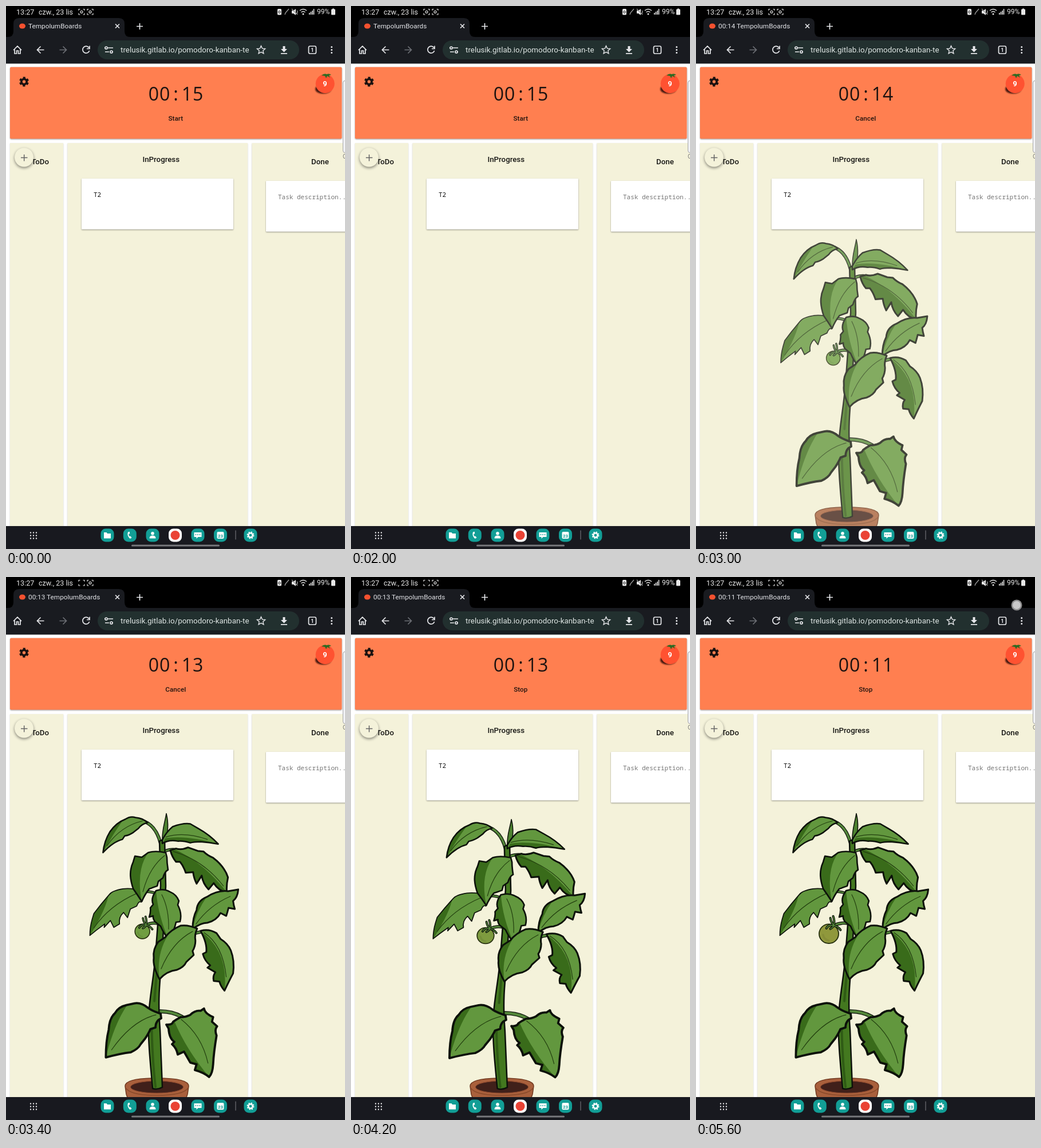
Animation of 592x947 px, one loop 5.8 s. Source, as an HTML page:

```html
<!DOCTYPE html>
<html lang="en">
<head>
<meta charset="utf-8">
<title>Kanban timer</title>
<style>
html, body { margin: 0; width: 100%; height: 100%; overflow: hidden; background: #fff; }
svg { display: block; font-family: Roboto, Arial, sans-serif; }
.line { fill: none; stroke: #e6e7ea; stroke-width: 1.7; }
.mono { font: 11px "Noto Sans Mono", "DejaVu Sans Mono", monospace; }
.clock { font: 32px "Open Sans", "Noto Sans", sans-serif; letter-spacing: .9px; fill: #1b1210; }
.head { font-size: 13.3px; font-weight: 500; fill: #161613; }
.card { filter: drop-shadow(0 1px 1.2px #0006); }
.panel { filter: drop-shadow(0 1px 1px #0003); }
.mid { text-anchor: middle; }
</style>
</head>
<body>
<svg width="592" height="947" viewBox="0 0 592 947">
  <defs><clipPath id="page"><rect y="100" width="592" height="807"/></clipPath></defs>
  <rect width="592" height="947" fill="#fff"/>

  <!-- status bar -->
  <rect width="592" height="100"/>
  <g fill="#e8e8e8">
    <text x="18" y="14.5" font-size="12.6">13:27</text>
    <text x="57" y="14.5" font-size="12.5">czw., 23 lis</text>
    <text x="543" y="14.3" font-size="12">99%</text>
    <rect x="568" y="5.5" width="7" height="10" rx="1.3"/><rect x="570" y="4.5" width="3" height="2"/>
    <rect x="474" y="5" width="7" height="10.5" rx="1.5"/>
    <path d="M499 8h3l4-3v11l-4-3h-3zM529 15v-3h1.6v3zm2.7 0v-5h1.6v5zm2.7 0v-7h1.6v7zM536.8 5h1.5v10h-1.5z"/>
    <circle cx="519" cy="14" r="1.5"/>
  </g>
  <circle cx="477.5" cy="10.5" r="1.8" fill="none" stroke="#111"/>
  <path d="M487 15l1-3 6-7M499 5l10 10M508 8q2 2 0 5" fill="none" stroke="#999" stroke-width="1.4"/>
  <path d="M513 8q6-5 12 0M515.5 11q3.5-3 7 0" fill="none" stroke="#e8e8e8" stroke-width="1.4"/>
  <g id="marks" fill="none" stroke="#ddd" stroke-width="1.2"></g>

  <!-- tab strip and toolbar -->
  <path d="M3 54q10 0 10-10V31q0-10 10-10h174q10 0 10 10v13q0 10 10 10h375v46.5H0V54z" fill="#191b20"/>
  <ellipse cx="28.5" cy="35" rx="5.5" ry="4.5" fill="#f4512f"/>
  <text id="title" x="39" y="39" font-size="11.8" fill="#e3e4e8"></text>
  <path class="line" d="M191 31.5l7 7m0-7l-7 7M228 35.5h11m-5.5-5.5v11" stroke-width="1.3"/>
  <rect x="160" y="60" width="352" height="33" rx="16.5" fill="#22302f"/>
  <text x="200" y="81" font-size="13.4" fill="#dfe6e4">trelusik.gitlab.io/pomodoro-kanban-te</text>
  <path class="line" d="M13 77l7-7 7 7M15 75v8h3.5v-5h3v5H25v-8M66.5 76.5H54.5m6-6l-6 6 6 6"/>
  <path class="line" d="M93.5 76.5h12m-6-6l6 6-6 6" style="stroke:#6d6f75"/>
  <path class="line" d="M145 73a6 6 0 1 0 .6 5M146 69.5v5h-5"/>
  <path class="line" d="M172 73h1m5 0h9M173 80h7m6 0h1"/>
  <circle class="line" cx="175" cy="73" r="2"/><circle class="line" cx="184" cy="80" r="2"/>
  <path class="line" d="M445.5 69.5l2.1 4.6 5 .5-3.8 3.3 1.1 5-4.4-2.6-4.4 2.6 1.1-5-3.8-3.3 5-.5z" style="stroke-width:1.4"/>
  <path d="M483.5 70h4v5h3.5l-5.5 5.5-5.5-5.5h3.5zM480 82h11v1.7h-11z" fill="#e6e7ea"/>
  <rect class="line" x="528.5" y="70" width="13" height="13" rx="2.5"/>
  <text class="mid" x="535" y="80" font-size="9.5" font-weight="700" fill="#e6e7ea">1</text>
  <path d="M568.7 71.5v0m0 5v0m0 5v0" stroke="#e6e7ea" stroke-width="3" stroke-linecap="round"/>

  <!-- timer panel -->
  <rect class="card" x="7" y="106.5" width="579.5" height="125" rx="2" fill="#ff7f50"/>
  <g fill="none" stroke="#1b1210">
    <circle cx="31.5" cy="132" r="4.6" stroke-width="3.8"/>
    <circle cx="31.5" cy="132" r="7" stroke-width="3" stroke-dasharray="4 3.33" transform="rotate(14 31.5 132)"/>
  </g>
  <ellipse cx="554" cy="145" rx="14" ry="8" fill="#4a1a10" style="filter:blur(1px)"/>
  <circle cx="557.2" cy="135.5" r="16.5" fill="#ff5231"/>
  <path d="M551 121q5-4 9-2 4-2 8 1l-4 1 2 4-5-3-2 4-2-4z" fill="#2c6b22"/>
  <text class="mid" x="557" y="140" font-size="13" font-weight="700" fill="#fff">9</text>
  <text class="clock" x="248.8" y="164.5">00</text>
  <text class="clock" x="292.2" y="164.5">:</text>
  <text class="clock" x="306.7" y="164.5" id="secs"></text>
  <text class="mid" x="296.3" y="200" font-size="11.7" font-weight="500" fill="#22130e" id="button"></text>

  <!-- board -->
  <g clip-path="url(#page)">
    <g fill="#f4f2da">
      <rect class="panel" x="7" y="239" width="93" height="680"/>
      <rect class="panel" x="107.5" y="239" width="314.5" height="680"/>
      <rect class="panel" x="429.5" y="239" width="180" height="680"/>
    </g>
    <text class="head" x="75" y="275.5" text-anchor="end">ToDo</text>
    <text class="head mid" x="270.8" y="271.5">InProgress</text>
    <text class="head" x="533" y="275.5">Done</text>
    <rect class="card" x="132" y="301" width="265" height="88.5" rx="1" fill="#fff"/>
    <rect class="card" x="454" y="305" width="160" height="88.5" rx="1" fill="#fff"/>
    <text class="mono" x="153" y="333" fill="#111">T2</text>
    <text class="mono" x="475" y="337" fill="#757575">Task description...</text>
    <circle cx="31.5" cy="264" r="16.5" fill="#f4f2da" style="filter:drop-shadow(0 2px 2.5px #0007)"/>
    <path d="M26 264.5h11.5M31.7 259v11.5" stroke="#666" stroke-width="1.5"/>
    <rect x="588.5" y="130" width="12" height="126" rx="4" fill="#f1f2f5" stroke="#a5a5a8"/>
    <text x="588" y="266" font-size="10" fill="#777">C</text>
    <g id="plant">
      <path d="M208 888q0-14 55.500-14t55.500 14l-2 14-5 14h-97l-5-14z" fill="#a9603c" stroke="#70381f" stroke-width="1.5"/>
      <path d="M209 891q8 13 54.500 13t54.500-13" fill="none" stroke="#8a4a2b" stroke-width="1.5"/>
      <ellipse cx="263.5" cy="889.5" rx="46" ry="10.5" fill="#40201a" stroke="#84432a"/>
      <g id="sway" stroke-linejoin="round" stroke-linecap="round"></g>
    </g>
  </g>

  <!-- dock -->
  <rect y="907" width="592" height="40" fill="#18191f"/>
  <path id="dots" stroke="#e8e8ea" stroke-width="2.4" stroke-linecap="round"/>
  <g id="tiles"></g>
  <path d="M401 914.5v16" stroke="#6a6b70" stroke-width="1.3"/>
  <g fill="#fff">
    <path d="M171 918h4.500l1.500 2h6v8.500h-12z"/>
    <path d="M213 917.500q-2.500 6 3.500 11.500l3-1.500-2-3-1.700.5q-2-2-1.500-4l2-.7-.5-3.500z"/>
    <circle cx="256" cy="919.7" r="2.8"/><path d="M250.500 928.500q0-5 5.500-5t5.500 5z"/>
    <path d="M328.500 918h13v8h-6l-3 3v-3h-4z"/>
    <rect x="368.5" y="917" width="12" height="12" rx="2"/>
  </g>
  <path d="M331.500 922v0m3.500 0v0m3.500 0v0" stroke="#129e96" stroke-width="1.8" stroke-linecap="round"/>
  <text class="mid" x="374.5" y="926.5" font-size="8" font-weight="700" fill="#129e96">23</text>
  <circle cx="427" cy="923" r="3.7" fill="none" stroke="#fff" stroke-width="2.5"/>
  <circle cx="427" cy="923" r="5.5" fill="none" stroke="#fff" stroke-width="2" stroke-dasharray="2.3 2.02"/>
  <circle cx="295.5" cy="923" r="8" fill="#ea4335"/>
  <path d="M220.500 941h151" stroke="#77787c" stroke-width="3" stroke-linecap="round"/>
  <g id="touch"><circle cx="560" cy="49" r="9.5" fill="#8d8d8d"/><circle cx="560" cy="49" r="7" fill="#c9c9c9"/></g>
</svg>
<script>
const $ = id => document.getElementById(id);
const LIGHT = '#62973e', DARK = '#396b1a', INK = '#0c110a';

// Small repeated icons
const corners = x => `<path d="M${x} 8v-2.500h2.500m5 0h2.500v2.500m0 4.500v2.500h-2.500m-5 0h-2.500v-2.500"/>`;
const record = x => `<circle cx="${x + 5}" cy="10.300" r="2"/>`;
$('marks').innerHTML = corners(127) + `<g id="blink">${record(127)}</g>` + corners(142) + record(142);
$('dots').setAttribute('d', [0, 1, 2].map(i => `M43 ${918.5 + 5 * i}h0m5 0h0m5 0h0`).join(''));
$('tiles').innerHTML = [177, 216.3, 256, 295.5, 335, 374.5, 427].map(x =>
  `<rect x="${x - 11.5}" y="911.5" width="23" height="23" rx="8.5" fill="${x === 295.5 ? '#fff' : '#129e96'}"/>`).join('');

let leaves = 0;
// Leaf outline, rough area of its shaded half, midrib, outline width
function leaf(d, shade, rib, width = 3) {
  const id = 'leaf' + leaves++;
  return `<clipPath id="${id}"><path d="${d}"/></clipPath><path d="${d}" fill="${LIGHT}"/>
    <path d="${shade}" fill="${DARK}" clip-path="url(#${id})"/>
    <path d="${d}" fill="none" stroke="${INK}" stroke-width="${width}"/>
    <path d="${rib}" fill="none" stroke="#23400f" stroke-width="1.2"/>`;
}
const stalk = (d, w) => `<path d="${d}" fill="none" stroke="${INK}" stroke-width="${w + 2.5}"/>
  <path d="${d}" fill="none" stroke="#54883a" stroke-width="${w}"/>`;

$('sway').innerHTML =
  stalk('M242 428Q262 436 270 466', 3.5) + stalk('M236 550Q255 548 272 557', 2.5) +
  stalk('M272 484Q280 475 298 477', 3) + stalk('M264 758Q290 757 308 768', 4.5) +
  stalk('M300 640Q320 622 346 619', 3.5) +
  `<path d="M273 463C272 442 277 432 280 414C284 430 284 450 276 463Z" fill="#4d8230" stroke="${INK}" stroke-width="1.5"/>
  <path d="M256 892C252 850 247 800 249 765C251 730 258 700 261 660L270 540L268 462L277 458L279 540L272 670C268 710 265 740 269 790L273 890Q264 895 256 892Z" fill="#43781f" stroke="${INK}" stroke-width="2.5"/>
  <path d="M254 770Q255 840 261 889M259 740L265 670" fill="none" stroke="#2f5b15" stroke-width="4"/>` +
  leaf('M169 482Q171 462 181 446Q192 430 208 424Q217 418 226 421Q239 422 247 430Q237 432 231 440L222 447Q214 452 207 453L203 459Q187 463 169 482Z',
    'M165 485L168 430L210 418Q192 440 169 482Z', 'M176 470Q200 436 238 427', 2.5) +
  leaf('M273 460Q280 446 291 437Q310 430 322 432L336 440Q356 451 371 467Q355 464 340 463Q328 463 322 465Q310 461 300 462Q285 459 273 466Z',
    'M272 470L278 457Q315 451 371 467L300 475Z', 'M279 455Q310 445 352 459', 2.5) +
  '<g id="fruit"></g>' +
  leaf('M238 549Q220 543 204 545Q185 548 180 555Q165 572 153 588L150 598Q146 612 146 626Q158 616 172 606L171 612L182 600L188 612L198 606Q196 594 205 586L212 595L217 580L228 575Q232 565 236 568L240 555Z',
    'M140 630L150 580L180 550Q175 580 146 626Z', 'M153 613Q180 574 228 553', 1.7) +
  leaf('M279 482Q260 478 248 482L237 490L225 488L222 498C214 515 217 530 222 545Q230 556 237 567Q242 555 250 545L264 540L266 532L274 526Q277 515 283 512Q281 500 281 490Z',
    'M210 480L250 480Q226 510 237 567L210 560Z', 'M277 487Q250 508 239 550', 2.6) +
  leaf('M287 478L297 475Q306 478 318 473L335 479L345 480Q352 487 362 491Q382 506 388 525Q385 538 386 551Q372 549 363 535L354 546Q344 536 342 522L333 536Q328 526 327 516L314 517Q310 505 304 498L297 498Q290 490 287 478Z',
    'M280 470Q340 492 386 551L330 560L280 510Z', 'M292 480Q345 495 380 540') +
  leaf('M262 548Q275 544 286 550Q298 555 302 566L300 573Q308 588 304 602L297 603Q294 618 284 633Q275 622 270 610L260 602Q256 596 257 592L250 594Q253 585 252 578L257 572Q252 562 262 548Z',
    'M245 545L262 547Q265 590 284 633L245 630Z', 'M272 555Q285 580 284 615', 2.6) +
  leaf('M326 615Q326 595 333 582Q334 566 351 559Q370 547 388 549L406 546Q405 560 397 566Q398 574 400 580L389 578Q387 586 385 592L375 587Q368 600 352 604Q340 604 326 615Z',
    'M320 618L330 575L352 557Q332 585 326 615Z', 'M332 606Q355 574 392 558') +
  leaf('M334 614Q318 607 305 609Q288 616 278 629L266 637Q256 650 258 665Q256 680 268 702Q281 688 298 686Q311 681 315 672L328 660L326 653Q331 645 331 635Q329 625 334 614Z',
    'M250 630L282 627Q262 660 268 702L250 705Z', 'M326 619Q290 638 271 684') +
  leaf('M340 618Q355 614 368 622L375 632Q388 640 393 652Q400 670 397 692Q390 705 382 722Q375 714 373 706L363 705Q361 696 366 690L352 682L357 678Q347 670 344 658L350 655Q352 640 340 618Z',
    'M335 615Q390 650 382 722L335 700Z', 'M346 621Q379 642 385 698') +
  leaf('M270 762Q255 757 248 752Q236 742 224 744L210 747Q196 750 190 761Q180 770 179 790Q174 810 174 838Q200 831 218 829Q231 823 235 815L243 805Q249 796 252 789L261 786Q261 778 266 773L271 770Z',
    'M168 840L175 760L215 742Q190 775 174 838Z', 'M262 764Q220 774 184 825', 3.8) +
  leaf('M305 768Q315 768 322 764Q330 756 340 757L346 753Q348 762 362 768L360 776L369 784Q364 790 368 800Q363 830 362 850Q361 866 355 872Q345 864 330 860L333 850L322 847L311 828L300 833Q298 822 290 815L294 811Q285 805 284 788L280 781Q290 782 292 776L298 772Z',
    'M275 775L294 775Q315 825 355 872L300 870Z', 'M306 772Q342 800 353 848', 3.8);

function drawFruit(r, x, y, color) {
  const cx = x + r * .5, cy = y - r * .85;
  const spikes = 'M0 1Q-9-3-13 5M0 0Q-5-6-6-13M0 0Q2-8-1-16M0 0Q8 2 12 8M0 0Q-1 3-6 6';
  $('fruit').innerHTML = stalk(`M267 606Q256 602 ${cx} ${cy}`, 3) +
    `<ellipse cx="${x}" cy="${y}" rx="${r}" ry="${r * .98}" fill="${color}" stroke="#26300f" stroke-width="${1 + r / 20}"/>
    <path d="M${x - r * .6} ${y + r * .1}q${r * .1} ${r * .5} ${r * .6} ${r * .6}" fill="none" stroke="#0001" stroke-width="${r * .2}"/>
    <g transform="translate(${cx} ${cy}) scale(${.65 + r / 50})">${stalk(spikes, 1.6)}</g>`;
}

const clamp = v => Math.max(0, Math.min(1, v));

function draw(now) {
  const t = Math.floor(now % 5800 / 200) * 200;
  const left = 15 - Math.max(0, Math.floor((t - 1400) / 1000));
  $('title').textContent = (t < 2400 ? '' : `00:${left} `) + 'TempolumBoards';
  $('secs').textContent = left;
  $('button').textContent = t < 2200 ? 'Start' : t < 4000 ? 'Cancel' : 'Stop';
  $('blink').setAttribute('opacity', [1, .1, 0, 0, .5][t % 1000 / 200]);
  $('touch').setAttribute('opacity', t < 5600 ? 0 : 1);
  $('plant').setAttribute('opacity', clamp((t - 2230) / 1000));

  const c = Math.cos((t - 4500) / 4000 * 2 * Math.PI);
  $('sway').setAttribute('transform',
    `translate(276 900) scale(${1 + .0225 * c} ${1 - .02 * c}) translate(-276 -900)`);
  if (t < 2800) drawFruit(28, 223, 646, '#bf4f2a');
  else {
    const grow = (t - 3400) / 540, ripe = clamp((t - 3200) / 2000);
    drawFruit(13 + grow, 238 - 1.5 * grow, 619 + grow,
      `rgb(${108 + 36 * ripe}, ${158 - 6 * ripe}, ${66 - 6 * ripe})`);
  }
  requestAnimationFrame(() => draw(performance.now() - start));
}
const start = performance.now();
draw(0);
</script>
</body>
</html>
```
